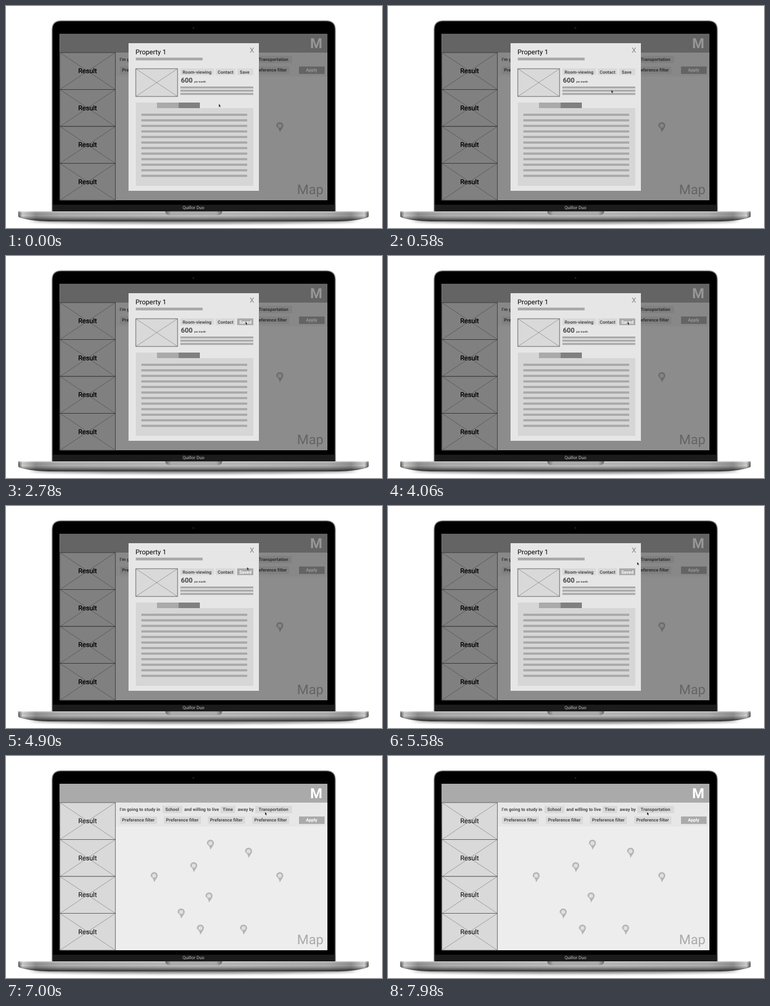
These frames come from a looping animation (675 px wide and 400 px high, 8000 ms). An HTML page:

```html
<!DOCTYPE html>
<html lang="en">
<head>
<meta charset="utf-8">
<title>Saving a property</title>
<style>
  html, body { margin: 0; width: 100%; height: 100%; overflow: hidden; background: #fff; }
  svg { display: block; width: 675px; height: 400px; font-family: Roboto, sans-serif; text-rendering: geometricPrecision; }
  .chip { font: bold 8px Roboto, sans-serif; }
  #cursor { animation: point 8s linear infinite; }
  #modal { animation: close 8s step-end infinite; }
  #saved { animation: save 8s step-end infinite; }
  @keyframes point {
    0%, .25% { transform: translate(382px, 176.5px); }
    10.25%   { transform: translate(409px, 140.5px); }
    15.5%    { transform: translate(421.3px, 122.3px); }
    19.5%, 21% { transform: translate(430.5px, 119.5px); }
    21.25%, 54.5% { transform: translate(430px, 118.3px); }
    64.5%    { transform: translate(433.8px, 106.3px); }
    69.75%   { transform: translate(447.2px, 101px); }
    73.75%, 75% { transform: translate(457.5px, 99px); }
    78.5%, 100% { transform: translate(465px, 101px); }
  }
  @keyframes close { 0% { visibility: visible; } 87.5%, 100% { visibility: hidden; } }
  @keyframes save { 0% { opacity: 0; } 34.75%, 100% { opacity: 1; } }
</style>
</head>
<body>
<svg viewBox="0 0 675 400">
  <defs>
    <linearGradient id="metal">
      <stop offset="0" stop-color="#555"/>
      <stop offset=".012" stop-color="#d6d6d6"/>
      <stop offset=".05" stop-color="#929292"/>
      <stop offset=".12" stop-color="#b2b2b2"/>
      <stop offset=".5" stop-color="#c4c4c4"/>
      <stop offset=".88" stop-color="#b2b2b2"/>
      <stop offset=".95" stop-color="#929292"/>
      <stop offset=".988" stop-color="#d6d6d6"/>
      <stop offset="1" stop-color="#555"/>
    </linearGradient>
    <linearGradient id="shade" x2="0" y2="1">
      <stop offset="0" stop-color="#fff" stop-opacity=".4"/>
      <stop offset=".4" stop-color="#000" stop-opacity="0"/>
      <stop offset=".65" stop-color="#000" stop-opacity=".25"/>
      <stop offset="1" stop-color="#000" stop-opacity=".75"/>
    </linearGradient>
    <linearGradient id="notch">
      <stop offset="0" stop-color="#666"/>
      <stop offset=".1" stop-color="#aaa"/>
      <stop offset=".9" stop-color="#aaa"/>
      <stop offset="1" stop-color="#666"/>
    </linearGradient>
    <filter id="soft" x="-10%" y="-150%" width="120%" height="400%">
      <feGaussianBlur stdDeviation="4 2.5"/>
    </filter>
    <path id="body" d="M22 370H651V379C651 383 622 388 590 388H83C51 388 22 383 22 379Z"/>
    <g id="pin">
      <path d="M0 10C-2-.5-6.300 1.500-6.300-2A6.300 6.300 0 0 1 6.300-2C6.300 1.500 2 6 0 10Z" fill="#b5b5b5"/>
      <circle cy="-1.800" r="3.600" fill="#dfdfdf"/>
    </g>
  </defs>

  <g id="laptop">
    <path d="M82.800 370V43Q82.800 26.800 99 26.800H575Q591.200 26.800 591.200 43V370Z" stroke="#888" stroke-width="1.600"/>
    <rect x="84" y="358" width="506.500" height="12" fill="#1b1b1b"/>
    <circle cx="336.500" cy="39.500" r="1.500" fill="#222"/>
    <text x="336.500" y="366" font-size="8" text-anchor="middle" fill="#c4c4c4">Quillor Duo</text>
    <ellipse cx="336.500" cy="387" rx="292" ry="5" opacity=".5" filter="url(#soft)"/>
    <use href="#body" fill="url(#metal)"/>
    <use href="#body" fill="url(#shade)"/>
    <path d="M286 370H388Q388 377 379 377H295Q286 377 286 370Z" fill="url(#notch)"/>
  </g>

  <g id="screen">
    <rect x="96.400" y="50" width="480.600" height="300" fill="#ededed"/>
    <rect x="96.400" y="84" width="480.600" height="43" fill="#e7e7e7"/>
    <rect x="96.400" y="50" width="480.600" height="34" fill="#aaa"/>
    <text x="557" y="76" font-size="25" font-weight="bold" text-anchor="middle" fill="#fff">M</text>
    <text x="522.500" y="339" font-size="24" fill="#aaa">Map</text>
  </g>

  <g id="modal">
    <rect x="96.400" y="50" width="480.600" height="300" opacity=".41"/>
    <g id="labels" font-size="12" text-anchor="middle"></g>
    <rect x="220" y="67" width="234" height="266" fill="#e6e6e6"/>
    <text x="232.500" y="87" font-size="12">Property 1</text>
    <path d="M438.500 75L444.500 84M444.500 75L438.500 84" stroke="#444" stroke-width=".8"/>
    <g id="card"></g>
    <text x="314" y="138" font-size="12.200" font-weight="bold" fill="#444">600</text>
    <text x="338" y="137.500" font-size="4.500" font-weight="bold" fill="#444">per month</text>
    <path d="M233 174H271V184H444V324H233Z" fill="#d6d6d6"/>
    <rect x="271" y="174" width="38.500" height="10" fill="#aaa"/>
    <rect x="309.500" y="174" width="38.500" height="10" fill="#808080"/>
    <g id="saved"></g>
  </g>

  <path id="cursor" d="M0 0V5.200L1.200 4.200L2.100 6.200L3 5.800L2.200 3.800H3.800Z" fill="#111" stroke="#fff" stroke-width=".25"/>
</svg>
<script>
  const $ = id => document.getElementById(id);

  function add(parent, tag, attrs, text = "") {
    const node = document.createElementNS("http://www.w3.org/2000/svg", tag);
    for (const key in attrs) node.setAttribute(key, attrs[key]);
    node.textContent = text;
    parent.append(node);
    return node;
  }

  const rect = (parent, x, y, width, height, fill) =>
    add(parent, "rect", { x, y, width, height, fill });

  const label = (parent, x, y, text, fill = "#4d4d4d") =>
    add(parent, "text", { x, y, fill, class: "chip" }, text);

  function chip(parent, x, y, width, height, text, inset, fill = "#d9d9d9", color) {
    rect(parent, x, y, width, height, fill);
    label(parent, x + inset, y + 9, text, color);
  }

  function placeholder(parent, x, y, w, h) {
    rect(parent, x, y, w, h, "#d9d9d9");
    add(parent, "path", {
      d: `M${x} ${y}l${w} ${h}M${x} ${y + h}l${w} ${-h}`, stroke: "#808080", "stroke-width": .7
    });
    add(parent, "rect", { x, y, width: w, height: h, fill: "none", stroke: "#555", "stroke-width": .9 });
  }

  const screen = $("screen"), modal = $("modal"), card = $("card");

  for (let i = 0; i < 4; i++) {
    placeholder(screen, 96.8, 84 + i * 66.5, 99.5, 66.5);
    const at = { x: 146.4, y: 121.2 + i * 66.5, "font-size": 12, "text-anchor": "middle" };
    add(screen, "text", at, "Result");
    add($("labels"), "text", at, "Result");
  }

  label(screen, 204, 99, "I’m going to study in");
  chip(screen, 281, 90, 35.5, 13, "School", 5);
  label(screen, 320, 99, "and willing to live");
  chip(screen, 385, 90, 26.5, 13, "Time", 4);
  label(screen, 416, 99, "away by");
  chip(screen, 447.5, 90, 66, 13, "Transportation", 6);
  for (const x of [204.5, 283.5, 362.5, 442])
    chip(screen, x, 109, 66.5, 13.5, "Preference filter", 3.7);
  chip(screen, 526, 109, 46, 13.5, "Apply", 12.5, "#aaa", "#fff");

  const pins = [[367, 159], [435.5, 173.5], [337, 199.5], [266, 217.5], [491.5, 217.5],
    [364.5, 254], [314.5, 283], [349, 312], [426.5, 312]];
  for (const [x, y] of pins) add(screen, "use", { href: "#pin", x, y });

  rect(card, 233, 93, 120, 5, "#aaa");
  placeholder(card, 233, 113, 75, 50);
  chip(card, 313, 112.5, 60, 12, "Room-viewing", 4);
  chip(card, 376.5, 112.5, 35, 12, "Contact", 3.5);
  chip(card, 415, 112.5, 29, 12, "Save", 4.5);
  for (let i = 0; i < 3; i++) rect(card, 313, 145 + i * 5.8, 131, 3.6, "#aaa");
  for (let i = 0; i < 12; i++) rect(modal, 243, 194 + i * 10, 190, 4, "#aaa");
  chip($("saved"), 415, 112.5, 29, 12, "Saved", 3.7, "#aaa", "#fff");
</script>
</body>
</html>
```
